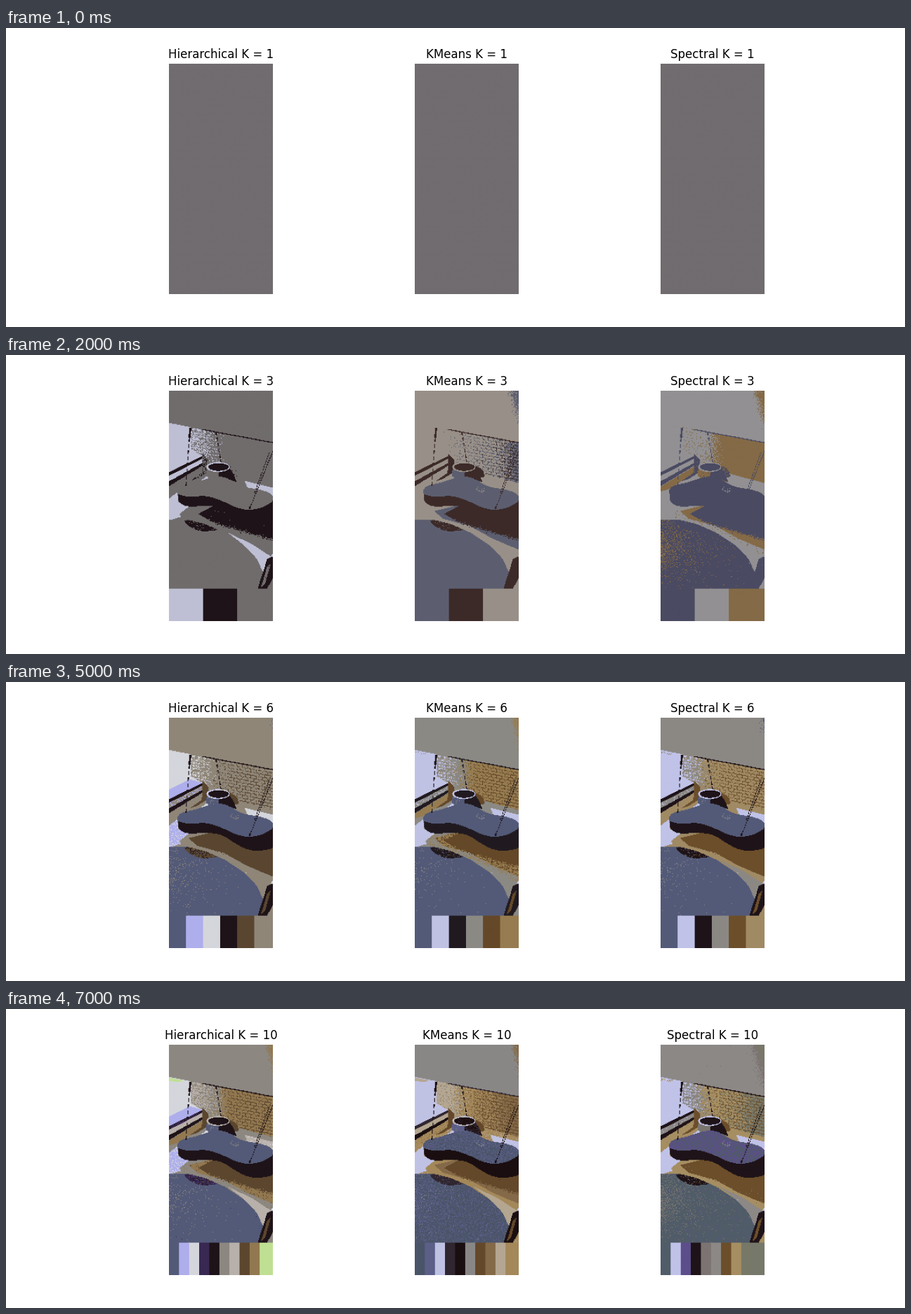
A matplotlib script for the animation above (8 s loop, 1280 by 427 pixels).

```python
import numpy as np
import matplotlib.pyplot as plt
from matplotlib.animation import FuncAnimation
from matplotlib.colors import to_rgb
from matplotlib.path import Path

W, H, BAR = 134, 256, 42
CELL = 148 / W
KS = [1, 2, 3, 4, 5, 6, 8, 10]

# One swatch row per value of K
PALETTES = {
    "Hierarchical": [
        "706c6f",
        "bdbfd4 6a6666",
        "bebfd4 1e1318 706c6c",
        "535a78 bebfd4 1e1318 82786c",
        "535a78 bebfd4 1e1318 584434 8f8678",
        "535a78 aeaeec d4d6dc 1e1318 5a4630 8f8678",
        "535a78 aeaeec d4d6dc 392852 1e1318 5c462e 8f8678 b8b4a0",
        "535a78 aeaeec d4d6dc 392852 1e1318 8c8780 b8b0aa 5c462e 927850 bfe092",
    ],
    "KMeans": [
        "706c6f",
        "4e4a54 928a84",
        "5c5e70 3c2a28 989088",
        "535a78 c0bfd0 3a2822 938a7e",
        "535a78 bebfd4 382822 8f8c86 8d724c",
        "535a78 c0c2e4 201a20 8b8984 644828 967c50",
        "4a5468 5c5f88 c0c2e4 201a20 898786 64482a b4a48c 937a50",
        "4a5468 5c5f88 c0c2e4 302630 1a0e10 898786 64482a 846a48 b4a690 a4885a",
    ],
    "Spectral": [
        "706c6f",
        "4e4a54 928a84",
        "4a4a62 929092 846a46",
        "4c4c62 bdc0e4 918c88 80643c",
        "535a78 c0c2e8 1e1318 918a80 725832",
        "535a78 c0c2e8 1e1318 8b8884 6c4e2a a08a64",
        "505c68 c0c2e8 5c4e8a 1e1318 7c7470 898682 6c5030 a68e68",
        "505c68 c0c2e8 5c4e8a 1e1318 7c7472 8c8886 6c4e2a a68e62 787868 76786a",
    ],
}

rng = np.random.default_rng(4)
Y, X = (np.mgrid[:H, :W] + 0.5) * CELL
GRID = np.column_stack([X.ravel(), Y.ravel()])
scene = np.zeros((H, W, 3))


def smooth(pts, rounds=3):
    """Round a closed polygon by cutting its corners."""
    pts = np.array(pts, float)
    for _ in range(rounds):
        nxt = np.roll(pts, -1, axis=0)
        pts = np.stack([0.8 * pts + 0.2 * nxt, 0.2 * pts + 0.8 * nxt], 1).reshape(-1, 2)
    return pts


def inside(pts):
    return Path(pts).contains_points(GRID).reshape(H, W)


def paint(mask, color):
    scene[mask] = color


def poly(color, *pts, rounded=False):
    mask = inside(smooth(pts) if rounded else pts)
    paint(mask, color)
    return mask


def ellipse(cx, cy, rx, ry):
    return ((X - cx) / rx) ** 2 + ((Y - cy) / ry) ** 2 < 1


def cord(p, q, width=1.2, dash=0, color=(24, 16, 20)):
    (x0, y0), (x1, y1) = p, q
    length = np.hypot(x1 - x0, y1 - y0)
    along = ((X - x0) * (x1 - x0) + (Y - y0) * (y1 - y0)) / length
    across = ((X - x0) * (y1 - y0) - (Y - y0) * (x1 - x0)) / length
    mask = (along >= 0) & (along <= length) & (abs(across) < width / 2)
    if dash:
        mask &= along % dash < 0.65 * dash
    paint(mask, color)


def mix(a, b, t):
    t = np.clip(t, 0, 1)[..., None]
    return np.array(a) * (1 - t) + np.array(b) * t


def chance(p):
    return rng.random((H, W)) < p


def draw_room():
    scene[:] = (163, 146, 118)

    # Brick wall, lighter on the left
    slope = Y - 0.19 * X
    t = (X - 48 + rng.normal(0, 6, (H, W))) / 40
    wall = mix((170, 158, 138), (147, 122, 84), t)
    wall = wall - np.clip((X - 110) / 4, 0, 9)[..., None]
    row = np.floor((slope - 46) / 4.4)
    joint = (slope - 46) % 4.4 < 1.2
    joint |= (X + 4 * (row % 2)) % 8 < 1.1
    wall[joint & chance(0.2 + 0.5 * np.clip((X - 60) / 50, 0, 1))] -= 34
    bright = ~joint & chance(0.55 * np.clip((84 - X) / 40, 0, 1))
    wall[bright] += (22, 24, 36)
    mask = (slope >= 46) & (Y < 92 + 0.27 * X)
    scene[mask] = wall[mask]

    # Shade around the bowl and along the desk's far edge
    poly((92, 68, 44), (48, 90), (56, 98), (56, 116), (40, 126), (20, 133), (48, 107))
    poly((94, 70, 46), (82, 106), (97, 112), (100, 124), (88, 124), rounded=True)
    poly((194, 190, 194), (108, 129), (150, 139), (150, 153), (130, 146), (112, 139))
    poly((150, 126, 84), (0, 137), (48, 108), (46, 118), (14, 140), (0, 144))

    # Window and the box beneath it
    poly((212, 213, 224), (-1, 46), (31, 52), (31, 84), (48, 93), (-1, 118))
    poly((184, 184, 234), (-1, 103), (30, 88), (48, 93), (48, 95), (-1, 119))
    poly((186, 216, 146), (-1, 47), (21, 51), (15, 53), (-1, 52))
    poly((46, 32, 54), (-1, 117), (48, 93), (48, 97), (-1, 122))
    poly((176, 168, 166), (-1, 122), (48, 97), (48, 103), (-1, 130))
    poly((32, 22, 24), (-1, 130), (48, 103), (48, 107), (-1, 137))

    # Ceiling with a darker corner and edge
    corner = (X - 124) / 22 - Y / 75 + rng.normal(0, 0.12, (H, W))
    ceiling = mix((142, 136, 128), (117, 110, 94), corner)
    mask = slope < 46
    scene[mask] = ceiling[mask]
    cord((48, 55.5), (150, 74.5), 1.4, color=(48, 36, 32))


def draw_desk():
    poly((192, 190, 222), (-2, 156), (12, 145), (14, 160), (32, 166), (18, 180), (-2, 186))

    # Bowl
    poly((112, 106, 112), (54, 110), (86, 110), (91, 120), (95, 130), (70, 131), (52, 128))
    poly((38, 28, 30), (72, 114), (86, 110), (91, 118), (97, 131), (84, 126), (70, 122))
    poly((200, 198, 206), (44, 130), (53, 122), (58, 125), (68, 124), (56, 130))
    paint(ellipse(70, 109, 16.5, 7), (188, 184, 186))
    paint(ellipse(70.5, 109, 14.5, 5.4), (36, 24, 26))

    # Shadow thrown on the desk and rim, fading into brown
    poly((150, 134, 108), (15, 176), (28, 166), (60, 165), (150, 190), (150, 240),
         (134, 262), (110, 224), (50, 191), (20, 185))
    poly((126, 100, 60), (28, 172), (60, 164), (150, 186), (150, 228), (110, 211),
         (78, 193), (40, 183))
    ragged = rng.normal(0, 1.5, (H, W))
    low = 178 + 0.29 * (X - 40) + ragged
    core = inside([(42, 176), (64, 164), (150, 180), (150, 232), (90, 205)])
    paint(core & (Y < low + 4), (82, 59, 40))
    poly((176, 168, 156), (84, 203), (118, 219), (150, 240), (150, 246), (134, 262),
         (122, 236), (106, 220))

    # Board: dark side, then blue top
    poly((29, 19, 24), (12, 141), (30, 140), (70, 145), (110, 160), (152, 150),
         (152, 186), (126, 191), (107, 187), (89, 176), (75, 167), (55, 164),
         (28, 166), (14, 161), rounded=True)
    poly((82, 83, 122), (11, 143), (18, 135), (35, 132), (50, 127), (62, 123),
         (80, 123), (92, 131), (108, 138), (128, 141), (142, 145), (149, 152),
         (147, 159), (133, 167), (113, 171), (93, 166), (73, 156), (53, 150),
         (28, 152), (13, 148), rounded=True)
    glint = inside([(86, 133), (92, 138), (102, 140), (96, 146), (88, 142)])
    paint(glint & chance(0.3), (150, 136, 118))


def draw_seat():
    seat = poly((81, 88, 114), (-20, 186), (0, 184), (25, 184), (50, 190), (80, 203),
                (108, 222), (125, 240), (133, 257), (135, 268), (128, 283), (-20, 300))
    scene[seat] += rng.normal(0, 5, (H, W, 1))[seat]
    density = 0.55 * np.exp(-X / 27) * np.exp(-((Y - 222) / 34) ** 2) + 0.012
    paint(seat & chance(density), (114, 108, 110))
    stain = inside(smooth([(20, 184), (50, 187), (74, 195), (66, 200), (44, 201), (28, 194)]))
    paint(stain & seat & chance(0.92), (60, 45, 45))

    # Frame at the lower right
    poly((26, 18, 22), (140, 240), (150, 236), (150, 264), (139, 284), (126, 284))
    poly((92, 70, 52), (140, 251), (145, 247), (137, 276), (131, 281))
    poly((206, 204, 212), (144, 238), (150, 229), (150, 238))


def draw_cords():
    cord((30.5, 53), (29, 67), 2.8)
    cord((29, 67), (24, 139), 1.3, 9)
    cord((67, 59), (74, 102), 1.5, 8)
    cord((148, 86), (115, 168), 1.4, 3.4)
    cord((143, 88), (122, 146), 1.2, 4.2)
    paint(ellipse(115, 167, 1.7, 1.7), (24, 16, 20))


def clustered(codes):
    """The scene in the given colours, with their swatches below."""
    colors = np.array([to_rgb("#" + c) for c in codes.split()])
    dist = ((scene[:, :, None] / 255 - colors) ** 2).sum(axis=-1)
    step = W // len(colors)
    index = np.minimum(np.arange(W) // step, len(colors) - 1)
    bar = np.tile(colors[index], (BAR, 1, 1))
    return np.vstack([colors[dist.argmin(axis=-1)], bar])


draw_room()
draw_desk()
draw_seat()
draw_cords()
scene += rng.normal(0, 2.5, (H, W, 1))

pictures = {name: [clustered(row) for row in rows] for name, rows in PALETTES.items()}

# The small excess keeps the height from rounding down to 426 pixels
fig, axes = plt.subplots(1, 3, figsize=(12.8, 4.2701), dpi=100)
panels = []
for ax, name in zip(axes, PALETTES):
    ax.axis("off")
    panels.append((name, ax.imshow(pictures[name][0]), ax.set_title(f"{name} K = 1")))


def update(i):
    for name, image, title in panels:
        image.set_data(pictures[name][i])
        title.set_text(f"{name} K = {KS[i]}")
    return [artist for _, *pair in panels for artist in pair]


anim = FuncAnimation(fig, update, frames=len(KS), interval=1000, repeat=True, repeat_delay=0)
plt.show()
```
